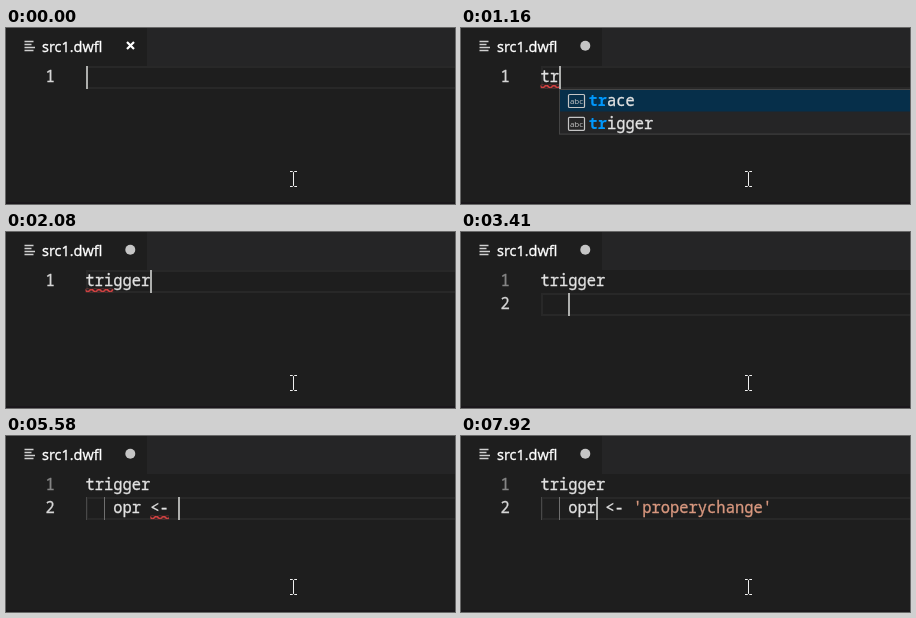
Animation, 449 px wide and 176 px high, one loop 8000 ms. Source, as an HTML page:

```html
<!DOCTYPE html>
<html lang="en">
<head>
<meta charset="utf-8">
<title>Editor completion</title>
<style>
html, body { margin: 0; width: 100%; height: 100%; overflow: hidden; background: #1e1e1e; }
svg { display: block; width: 449px; height: 176px; }
.code { font: 15.43px "Noto Sans Mono", "DejaVu Sans Mono", monospace; white-space: pre; stroke-width: 0.3px; }
.tab { font: 14.5px "Open Sans", "Noto Sans", sans-serif; fill: #fff; stroke: #fff; stroke-width: 0.35px; }
.abc { font: 8px "Open Sans", sans-serif; fill: #c5c5c5; }
.match { fill: #0097fb; stroke: none; font-weight: bold; }
</style>
</head>
<body>
<svg viewBox="0 0 449 176">
  <defs>
    <pattern id="wave" width="6" height="3" patternUnits="userSpaceOnUse">
      <path d="M5.5 0 2.5 3H1.1L4.1 0ZM4 0 6 2V.6L5.4 0ZM0 2 1 3H2.4L0 .6Z" fill="#f44747" stroke="#f44747" stroke-width="0.25"/>
    </pattern>
  </defs>
  <rect width="449" height="176" fill="#1e1e1e"/>
  <rect x="141" width="308" height="38" fill="#252526"/>
  <rect y="174" width="449" height="2" fill="#1a171b"/>
  <path d="M18.5 13.5h9M18.5 16.5h7M18.5 19.5h10.5M18.5 22.5h9" stroke="#d0d0d0" stroke-width="1.5"/>
  <text class="tab" x="36" y="23.5">src1.dwfl</text>
  <path id="close" d="M121 14l7 7M128 14l-7 7" stroke="#fff" stroke-width="2.2"/>
  <circle id="dirty" cx="124.3" cy="17.8" r="5" fill="#c5c5c5"/>
  <g id="editor"></g>
  <path d="M284 143.5h2.5l1 1 1-1h2.5M287.5 144.5v13M284 158.5h2.5l1-1 1 1h2.5" fill="none" stroke="#f0f0f0"/>
</svg>
<script>
const LOOP = 8000, LEFT = 80, TOP = 38, LINE = 23, CHAR = 9.26, ROW = 22.8;

// Each step changes the editor state from its time on.
// caret: column, wave: [line, from, to], popup: items offered at the caret
const steps = [
  [0, { line1: "", line2: null, row: 0, caret: 0, on: true, wave: null, popup: null, typed: 0 }],
  [300, { on: false }],
  [850, { line1: "t", caret: 1, on: true, wave: [0, 0, 1], popup: ["table", "trace", "trigger"], typed: 1 }],
  [1080, { line1: "tr", caret: 2 }],
  [1160, { wave: [0, 0, 2], popup: ["trace", "trigger"], typed: 2 }],
  [1240, { line1: "tri", caret: 3, wave: [0, 0, 3], popup: ["trigger"], typed: 3 }],
  [1700, { on: false }],
  [2080, { line1: "trigger", caret: 7, on: true, popup: null }],
  [2310, { wave: null }],
  [2540, { line2: "", row: 1, caret: 0 }],
  [2940, { caret: 1 }],
  [3240, { caret: 2 }],
  [3410, { caret: 3 }],
  [3790, { line2: "o", caret: 4 }],
  [3900, { line2: "op", caret: 5 }],
  [4020, { line2: "opr", caret: 6, wave: [0, 0, 7] }],
  [4420, { caret: 7 }],
  [4800, { line2: "opr <", caret: 8 }],
  [5120, { line2: "opr <-", caret: 9 }],
  [5350, { caret: 10 }],
  [5580, { wave: [1, 7, 9] }],
  [5730, { line2: "opr <- ''", caret: 11 }],
  [6050, { wave: null }],
  [6360, { on: false }],
  [6740, { line2: "opr <- 'properychange'", caret: 24, on: true }],
  [6970, { caret: 11 }],
  [7200, { caret: 10 }],
  [7440, { caret: 7 }],
  [7920, { caret: 6 }]
];

const $ = id => document.getElementById(id);
const colX = col => LEFT + col * CHAR;
const rowY = row => TOP + row * LINE;
const escape = s => s.replace(/</g, "&lt;");
const rect = (x, y, w, h, fill) => `<rect x="${x}" y="${y}" width="${w}" height="${h}" fill="${fill}"/>`;
const code = (x, y, s, color = "#e2e2e2") =>
  `<text class="code" x="${x - 0.5}" y="${y}" fill="${color}" stroke="${color}">${s}</text>`;

function stateAt(time) {
  return Object.assign({}, ...steps.filter(([start]) => start <= time).map(([, change]) => change));
}

function highlight(row) {
  const y = rowY(row);
  return rect(LEFT, y, 369, 2, "#282828") + rect(LEFT, y + 21, 369, 2, "#282828") +
    rect(LEFT, y, 2, LINE, "#282828");
}

function lineNumber(row, active) {
  return code(40, rowY(row) + 16, row + 1, active ? "#d6d6d6" : "#858585");
}

function secondLine(s) {
  const at = s.indexOf("'");
  const plain = at < 0 ? s : s.slice(0, at);
  let out = "";
  if (s) out += rect(80, 61, 1, LINE, "#484848") + rect(98, 61, 1, LINE, "#707070");
  out += code(colX(3), 77, escape(plain));
  if (at >= 0) out += code(colX(3 + at), 77, s.slice(at), "#d9987f");
  return out;
}

function squiggle([row, from, to]) {
  const w = (to - from) * CHAR / 1.25;
  return `<g transform="translate(${colX(from) - 0.5} ${rowY(row) + 18.6}) scale(1.25)">` +
    rect(0, 0, w, 3, "url(#wave)") + "</g>";
}

function popup(items, typed) {
  const x = Math.floor(colX(typed)), y = 61;
  const rows = items.map((item, i) => {
    const top = y + i * ROW;
    return `<rect x="${x + 9.5}" y="${top + 5.5}" width="16" height="13" rx="1" fill="none" stroke="#c5c5c5" stroke-width="1.2"/>` +
      `<text class="abc" x="${x + 17.5}" y="${top + 14.7}" text-anchor="middle">abc</text>` +
      code(x + 30, top + 17, `<tspan class="match">${item.slice(0, typed)}</tspan>${item.slice(typed)}`);
  });
  const h = ROW * items.length - 1;
  return `<rect x="${x + 0.5}" y="${y + 0.5}" width="380" height="${h}" fill="#252526" stroke="#454545"/>` +
    rect(x + 1, y + 1, 380, ROW - 1.3, "#062f4a") + rows.join("");
}

function draw(time) {
  const s = stateAt(time);
  const edited = s.line1 !== "";
  $("close").style.display = edited ? "none" : "";
  $("dirty").style.display = edited ? "" : "none";
  let out = highlight(s.row) + lineNumber(0, s.row === 0) + code(LEFT, 54, s.line1);
  if (s.line2 !== null) out += lineNumber(1, true) + secondLine(s.line2);
  if (s.wave) out += squiggle(s.wave);
  if (s.on) out += rect(Math.floor(colX(s.caret) + 0.15), rowY(s.row), 2, LINE, "#aeafad");
  if (s.popup) out += popup(s.popup, s.typed);
  $("editor").innerHTML = out;
}

const begin = performance.now();
function tick() {
  draw((performance.now() - begin) % LOOP);
  requestAnimationFrame(tick);
}
tick();
</script>
</body>
</html>
```
